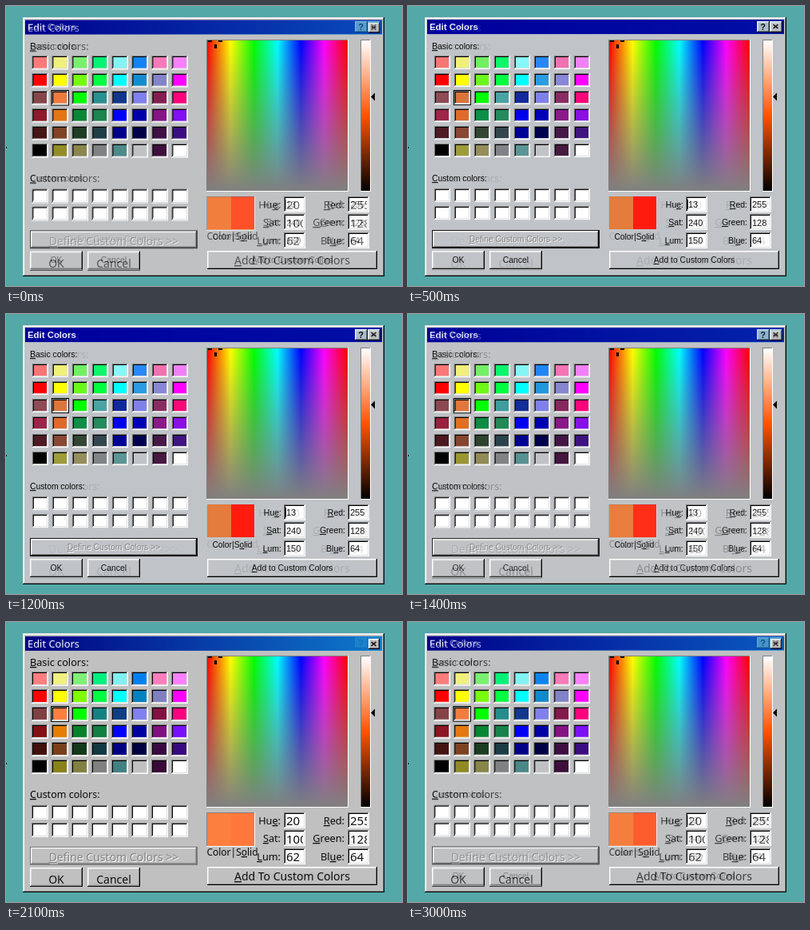
Animation, 496 px wide and 350 px high, one loop 3100 ms. Source, as an HTML page:

```html
<!DOCTYPE html>
<html lang="en">
<head>
<meta charset="utf-8">
<title>Edit Colors</title>
<style>
html, body { margin: 0; width: 100%; height: 100%; overflow: hidden; background: #54a8a8; }
svg { display: block; width: 496px; height: 350px; }
rect { shape-rendering: crispEdges; }
text { white-space: pre; }
.key { text-decoration: underline; }
.classic { font-family: "Liberation Sans", Arial, sans-serif; }
.modern { font-family: "Noto Sans", "Open Sans", sans-serif; }
</style>
</head>
<body>
<svg id="stage" viewBox="0 0 496 350" xmlns="http://www.w3.org/2000/svg"></svg>
<script>
const LOOP = 3100, STEP = 100, PEAK = 2400;

const rect = (x, y, w, h, fill) =>
  `<rect x="${x}" y="${y}" width="${w}" height="${h}" fill="${fill}"/>`;

// Two-pixel bevel: outer and inner colours for top-left and bottom-right.
const bevel = (x, y, w, h, face, [tl, br, tl2, br2]) =>
  rect(x, y, w, h, br) + rect(x, y, w - 1, h - 1, tl) +
  rect(x + 1, y + 1, w - 2, h - 2, br2) + rect(x + 1, y + 1, w - 3, h - 3, tl2) +
  rect(x + 2, y + 2, w - 4, h - 4, face);

const RAISED = ['#fff', '#000', '#dfdfdf', '#808080'];
const SOFT = ['#fff', '#808080', '#d0d0d0', '#a0a0a0'];
const SUNKEN = ['#808080', '#fff', '#000', '#dfdfdf'];

// "&" marks the underlined access key.
const label = (s, x, y, size, { fill = '#000', anchor = 'start', weight = 400 } = {}) => {
  const body = s.replace(/>/g, '&gt;').replace(/&(?!gt;)(.)/, '<tspan class="key">$1</tspan>');
  return `<text x="${x}" y="${y}" font-size="${size}" font-weight="${weight}" text-anchor="${anchor}" fill="${fill}">${body}</text>`;
};

const classic = {
  name: 'classic', face: '#c0c4c8', dy: 0,
  title: { fill: '#0000a0', size: 11.4, y: 30, weight: 700 },
  text: 10.5, custom: 10.3, button: 10.4, digit: 11, small: 10.3,
  heads: [54, 219], rows: [252, 274, 297], digits: [252, 275, 297],
  defineY: 295, okY: 321, addY: 321, add: '&Add to Custom Colors',
  values: [['13', '255'], ['240', '128'], ['150', '64']],
  cell: { x: 33, y: 62, customY: 228, w: 20, h: 17 },
  define: { edge: '#000', bevel: RAISED },
  swatch: ['#e07c3c', '#ff100a'],
  colors: [
    'f87474 f0f078 70f060 10f868 88f8f8 3088f8 f070b0 f080f8',
    'ff0000 ffff00 68f820 00ff40 00ffff 30a0e8 8888d8 ff00ff',
    '904c58 d8743c 00ff00 50a8a8 1428a0 8080e8 8c3068 f80878',
    'a02850 e06830 10904c 288c60 0000e8 0000b8 8c1c8c 8c10e0',
    '501c28 8c4838 384838 384850 000098 000050 481c48 401880',
    '000000 a0a03c 989060 808488 609898 c0c4c8 481c40 ffffff']
};

const modern = {
  name: 'modern', face: '#c0c0c0', dy: 1,
  title: { fill: 'url(#caption)', size: 12.9, y: 32, weight: 400 },
  text: 12.7, custom: 12.5, button: 14, digit: 15, small: 12,
  heads: [55, 220], rows: [253, 275, 298], digits: [254, 277, 299],
  defineY: 299, okY: 327, addY: 323, add: '&Add To Custom Colors',
  values: [['20', '255'], ['100', '128'], ['62', '64']],
  cell: { x: 32, y: 62, customY: 229, w: 21, h: 18 },
  define: { edge: '#808080', bevel: SOFT },
  swatch: ['#ff8040', '#ff8040'],
  colors: [
    'ff8080 f0f080 80f078 00f080 80f0f0 0080f0 ff80c0 ff80ff',
    'ff0000 ffff00 80ff00 00ff40 00ffff 0080c0 8080c0 ff00ff',
    '804040 ff8040 00ff00 108080 104080 8080f0 801040 ff0080',
    '801010 e88000 088028 108040 0000ff 0000a0 801080 7810ff',
    '401008 784018 103818 103840 000080 000040 380840 380880',
    '000000 888018 808040 808080 408080 c0c0c0 380838 ffffff']
};

function swatches(k) {
  const { x, y, customY, w, h } = k.cell;
  let out = rect(x + 24, y + 43, w + 2, h + 2, '#000');
  k.colors.forEach((row, r) => row.split(' ').forEach((c, i) => {
    out += bevel(x + 25 * i, y + 22 * r, w, h, '#' + c, SUNKEN);
  }));
  for (let r = 0; r < 2; r++)
    for (let i = 0; i < 8; i++)
      out += bevel(x + 25 * i, customY + 22 * r, w, h, '#fff', SUNKEN);
  return out;
}

function picker() {
  return rect(251, 42, 178, 190, '#fff') + rect(251, 42, 177, 189, '#808080') +
    rect(252, 43, 176, 188, 'url(#hue)') + rect(252, 43, 176, 188, 'url(#fade)') +
    rect(253, 43, 5, 2, '#000') + rect(266, 43, 5, 2, '#000') + rect(261, 48, 3, 5, '#000') +
    rect(444, 42, 13, 190, '#fff') + rect(444, 42, 12, 189, '#808080') +
    rect(445, 43, 11, 188, 'url(#lum)') +
    '<path d="M457 113.500L462 108.500V118.500Z"/>';
}

function fields(k) {
  const names = [['Hu&e:', '&Red:'], ['&Sat:', '&Green:'], ['&Lum:', 'Bl&ue:']];
  let out = '';
  names.forEach((pair, r) => pair.forEach((s, c) => {
    const x = 348 + 80 * c, y = [238, 260, 283][r];
    out += label(s, x - 3 - k.dy, k.rows[r], k.text, { anchor: 'end' }) +
      bevel(x, y, 27, 20, '#fff', SUNKEN) +
      `<g clip-path="url(#col${c})">${label(k.values[r][c], x + 3, k.digits[r], k.digit)}</g>`;
  }));
  return out;
}

function caption(k) {
  const t = k.title, d = 2 * k.dy;
  let out = rect(24, 17 + k.dy, 447, 18, t.fill) +
    label('Edit Colors', 27, t.y, t.size, { fill: '#fff', weight: t.weight }) +
    bevel(453 + k.dy, 19 + d, 16 - d, 14 - k.dy, k.face, RAISED) +
    `<path d="M457.500 ${23 + d}l6 5m0 -5l-6 5" stroke="#000" stroke-width="1.600"/>`;
  if (k === classic)
    out += bevel(437, 19, 16, 14, k.face, RAISED) +
      label('?', 444.5, 30, 11, { anchor: 'middle', weight: 700 });
  return out;
}

function buttons(k) {
  const mid = { anchor: 'middle' }, d = k.dy;
  const define = '&Define Custom Colors >>';
  return rect(30, 280 + d, 210, 23, k.define.edge) +
    bevel(31, 281 + d, 208, 21, k.face, k.define.bevel) +
    label(define, 136, k.defineY + 1, k.button, { ...mid, fill: '#fff' }) +
    label(define, 135, k.defineY, k.button, { ...mid, fill: '#808080' }) +
    bevel(30, 306 + d, 66, 23 + d, k.face, RAISED) +
    label('OK', 63, k.okY, k.button, mid) +
    bevel(102, 306 + d, 66, 23 + d, k.face, RAISED) +
    label('Cancel', 135, k.okY, k.button, mid) +
    bevel(252, 306, 213, 23, k.face, RAISED) +
    label(k.add, 358.5, k.addY, k.button, mid);
}

function sample(k) {
  const y = 238 + k.dy;
  return (k === modern ? rect(251, y - 1, 61, 43, '#fff') + rect(251, y - 1, 60, 42, '#808080') : '') +
    rect(252, y, 30, 41, k.swatch[0]) + rect(282, y, 29, 41, k.swatch[1]) +
    label('Color|S&olid', 283.5, 292, k.small, { anchor: 'middle' });
}

function dialog(k) {
  return `<g id="${k.name}" class="${k.name}">` +
    bevel(21, 14, 453, 324, k.face, ['#dfdfdf', '#000', '#fff', '#808080']) +
    caption(k) +
    label('&Basic colors:', 30, k.heads[0], k.text) +
    label('&Custom colors:', 30, k.heads[1], k.custom) +
    swatches(k) + picker() + sample(k) + fields(k) +
    (k === classic ? rect(350, 242, 1, 12, '#000') : '') +
    buttons(k) + '</g>';
}

const gradient = (id, colors, axis) =>
  `<linearGradient id="${id}" x1="0" y1="0" x2="${axis === 'x' ? 1 : 0}" y2="${axis === 'y' ? 1 : 0}">` +
  colors.map((c, i) => `<stop offset="${i / (colors.length - 1)}" stop-color="${c}"/>`).join('') +
  '</linearGradient>';

const clip = (id, x) => `<clipPath id="${id}"><rect x="${x}" y="238" width="22" height="66"/></clipPath>`;

document.getElementById('stage').innerHTML = '<defs>' +
  gradient('hue', ['#f00', '#ff0', '#0f0', '#0ff', '#00f', '#f0f', '#f00'], 'x') +
  gradient('fade', ['rgba(128,128,128,0)', 'rgb(128,128,128)'], 'y') +
  gradient('lum', ['#fff', '#ff5300', '#000'], 'y') +
  gradient('caption', ['#000080', '#1084d0'], 'x') +
  clip('col0', 350) + clip('col1', 430) + '</defs>' +
  rect(0, 0, 496, 350, '#54a8a8') + rect(0, 176, 1, 2, '#000') +
  dialog(classic) + dialog(modern);

const overlay = document.getElementById('modern');

// Stepped cosine cross-fade between the two dialogs.
function draw(ms) {
  const t = Math.floor((ms % LOOP) / STEP) * STEP;
  const mix = .5 + .52 * Math.cos(2 * Math.PI * (t - PEAK) / LOOP);
  overlay.setAttribute('opacity', Math.min(1, Math.max(0, mix)).toFixed(3));
}

const start = performance.now();
function tick() {
  draw(performance.now() - start);
  requestAnimationFrame(tick);
}
draw(0);
requestAnimationFrame(tick);
</script>
</body>
</html>
```
